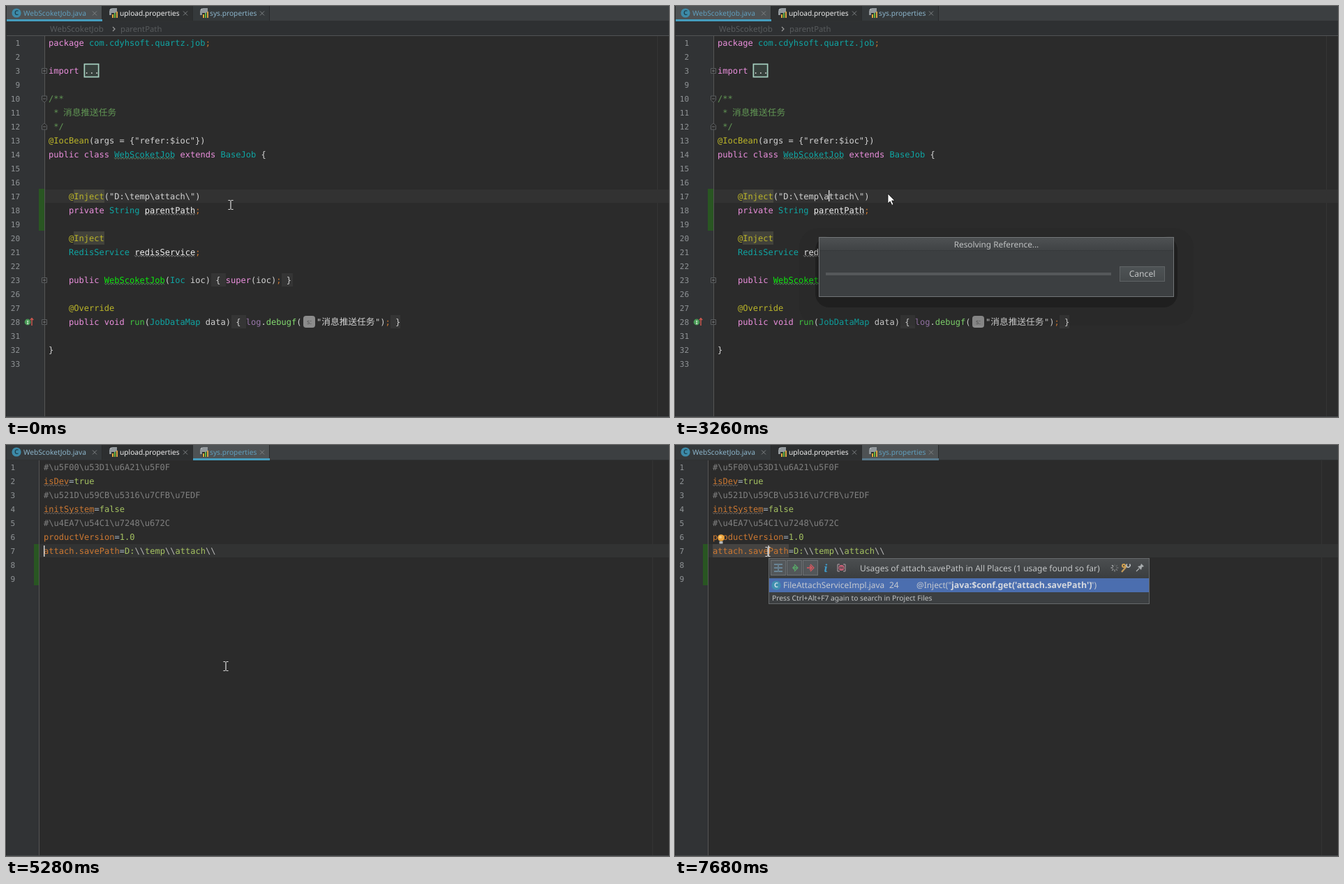
These frames come from a looping animation (950 by 589 pixels, 8000 ms). An HTML page with a canvas:

```html
<!DOCTYPE html>
<html lang="en">
<head>
<meta charset="utf-8">
<title>Editor</title>
<style>
html, body { margin: 0; width: 100%; height: 100%; overflow: hidden; background: #2b2b2b; }
canvas { display: block; width: 950px; height: 589px; }
</style>
</head>
<body>
<canvas id="stage"></canvas>
<script>
const W = 950, H = 589, LOOP = 8000, CW = 7.25;
const MONO = '12.04px "DejaVu Sans Mono", monospace';
const CJK = '12.7px "Noto Sans CJK SC", "Noto Sans CJK", sans-serif';
const ui = (size, weight = '') => `${weight} ${size}px "Noto Sans", sans-serif`;

const canvas = document.getElementById('stage');
const ratio = window.devicePixelRatio || 1;
canvas.width = W * ratio;
canvas.height = H * ratio;
const g = canvas.getContext('2d');
g.scale(ratio, ratio);
g.textRendering = 'geometricPrecision';

const INK = {
  k: '#ea8fdc', c: '#0fa5a3', w: '#d3d3d3', v: '#f0f0f0', o: '#cc7832',
  a: '#bbb529', m: '#41c441', n: '#0ee60e', d: '#83d96f', p: '#9876aa',
  g: '#629755', h: '#808080', e: '#a9b7c6', s: '#a5c261', b: '#b9b9b9'
};

function box(x, y, w, h, color) {
  g.fillStyle = color;
  g.fillRect(x, y, w, h);
}
function frame(x, y, w, h, color, width = 1) {
  g.strokeStyle = color;
  g.lineWidth = width;
  g.strokeRect(x + width / 2, y + width / 2, w - width, h - width);
}
function path(points, color, width = 1, close = false) {
  g.beginPath();
  points.forEach(([x, y], i) => i ? g.lineTo(x, y) : g.moveTo(x, y));
  if (close) g.closePath();
  g.strokeStyle = color;
  g.lineWidth = width;
  g.stroke();
}
function shape(points, color) {
  g.beginPath();
  points.forEach(([x, y]) => g.lineTo(x, y));
  g.fillStyle = color;
  g.fill();
}
function round(x, y, w, h, r, color) {
  g.beginPath();
  g.roundRect(x, y, w, h, r);
  g.fillStyle = color;
  g.fill();
}
function disc(x, y, r, color) {
  g.beginPath();
  g.arc(x, y, r, 0, 7);
  g.fillStyle = color;
  g.fill();
}
function text(s, x, y, color, font = MONO, align = 'left') {
  g.font = font;
  g.textAlign = align;
  g.fillStyle = color;
  g.fillText(s, x, y);
}
function blend(x, y, w, h, top, bottom) {
  const grad = g.createLinearGradient(0, y, 0, y + h);
  grad.addColorStop(0, top);
  grad.addColorStop(1, bottom);
  box(x, y, w, h, grad);
}
// Draws "ink:text" spans on the character grid; y is the middle of the line.
function code(x, y, ...spans) {
  for (const span of spans) {
    const s = span.slice(2);
    text(s, x, y + 4, INK[span[0]]);
    x += s.length * CW;
  }
}
function wave(x, y, w, color) {
  const pts = [];
  for (let i = 0; i <= w; i += 2) pts.push([x + i, y + (i / 2 % 2 ? 1.4 : -0.8)]);
  path(pts, color, 0.75);
}
function badge(x, y, letter, color, ink) {
  disc(x, y, 6.6, color);
  text(letter, x, y + 3.3, ink, ui(9.5, 'bold'), 'center');
}
function cross(x, y) {
  path([[x - 3, y - 3], [x + 3, y + 3]], '#7d8183');
  path([[x + 3, y - 3], [x - 3, y + 3]], '#7d8183');
}
function sheet(x) {
  shape([[x + 4, 3], [x + 11, 3], [x + 11, 8], [x + 5, 13], [x, 13], [x, 7]], '#92989c');
  shape([[x, 6], [x + 3, 3], [x + 3, 6]], '#b5babd');
  box(x + 3, 10, 9, 7, '#2d2f30');
  box(x + 4, 12, 2, 5, '#e0a83c');
  box(x + 7, 10, 2, 7, '#62b543');
  box(x + 10, 8, 2, 9, '#d9a343');
}
function fold(y, kind) {
  const x = 55;
  const pts = kind === '+' ? [[-3.5, -3.5], [3.5, -3.5], [3.5, 3.5], [-3.5, 3.5]]
    : kind === 'v' ? [[-3.5, -4], [3.5, -4], [3.5, 2], [0, 5], [-3.5, 2]]
    : [[-3.5, 4], [3.5, 4], [3.5, -2], [0, -5], [-3.5, -2]];
  const at = pts.map(([a, b]) => [x + a, y + b]);
  shape(at, '#2b2b2b');
  path(at, '#5b5e60', 1, true);
  path([[x - 2, y], [x + 2, y]], '#707375');
  if (kind === '+') path([[x, y - 2], [x, y + 2]], '#707375');
}
function caret(x, y) { box(x, y - 8, 1.4, 16, '#dddddd'); }

function tabs(active, focused) {
  box(0, 0, W, 22, '#3c3f41');
  box(0, 21, W, 1, '#2f3132');
  const list = [['WebScoketJob.java', 0, 138, 25], ['upload.properties', 138, 130, 163],
    ['sys.properties', 268, 110, 292]];
  list.forEach(([name, x, w, tx], i) => {
    const on = i === active;
    box(x, 0, w, 21, on ? '#4e5254' : i === 1 ? '#2d2f30' : '#35393b');
    box(x + w - 1, 0, 1, 21, '#292b2c');
    if (on) box(x, 19, w, 3, focused ? '#459cbd' : '#58788a');
    if (i) sheet(x + 10);
    else badge(15, 10, 'C', '#3d8ba9', '#1f4350');
    text(name, tx, 14, i === 1 ? '#eeeeee' : on ? '#609fbe' : '#8cb5cb', ui(10.2));
    cross(x + w - 11, 10.5);
  });
}
function gutter(top, width, right, numbers, first) {
  box(0, top, width, H - top, '#313335');
  box(width, top, 1, H - top, '#555555');
  numbers.forEach((n, i) => text(n, right, first + 20 * i + 4, '#909497',
    '11px "DejaVu Sans Mono", monospace', 'right'));
}
function edges() {
  box(0, 0, 1, H, '#292b2c');
  box(0, H - 1, W, 1, '#45484a');
}

function javaFile(t) {
  const open = t >= 3660;
  box(0, 0, W, H, '#2b2b2b');
  box(933, 43, 1, H, '#353535');
  box(0, 22, W, 20, '#2e3032');
  text('WebScoketJob', 63, 37, '#585b5d', ui(11.5));
  path([[153, 30], [156, 33], [153, 36]], '#999999', 1.2);
  text('parentPath', 164, 37, '#585b5d', ui(11.3));
  const lines = [1, 2, 3];
  for (let n = 9; n <= 23; n++) lines.push(n);
  lines.push(26, 27, 28, 31, 32, 33);
  gutter(42, 55, 20, lines, 53);
  box(0, 42, W, 1, '#515354');
  box(56, 263, W, 19, '#323232');
  box(47, 262, 8, 60, '#295622');
  [[93, '+'], [133, 'v'], [173, '^'], [393, '+'], [453, '+']].forEach(f => fold(...f));
  disc(31, 453, 4.4, '#4a9b57');
  text('I', 31, 456, '#dff0df', ui(7, 'bold'), 'center');
  path([[37, 458], [37, 448]], '#d45a50', 1.4);
  path([[34.8, 450], [37, 447.5], [39.2, 450]], '#d45a50', 1.2);

  box(97, 263, 44, 19, '#46463e');
  box(97, 323, 44, 19, '#42423b');
  [[294, 385, 21], [395, 385, 16], [323, 445, 21], [551, 445, 14]]
    .forEach(([x, y, w]) => box(x, y - 2, w, 19, '#353535'));

  const L = 61, T = 90;
  code(L, 53, 'k:package ', 'c:com.cdyhsoft.quartz.job', 'o:;');
  code(L, 93, 'k:import ');
  box(112, 83, 21, 19, '#37403c');
  frame(111.5, 82.5, 22, 20, '#a6d0c0', 1.7);
  code(112, 93, 'w:...');
  code(L, 133, 'g:/**');
  code(L, 153, 'g: *');
  text('消息推送任务', 82, 157, INK.g, CJK);
  code(L, 173, 'g: */');
  code(L, 193, 'a:@IocBean', 'w:(args = {"refer:$ioc"})');
  code(L, 213, 'k:public class ', 'c:WebScoketJob', 'k: extends ', 'c:BaseJob', 'w: {');
  wave(155, 218, 87, '#699a78');
  code(T, 273, 'a:@Inject', open ? `w:("java:$conf.get('attach.savePath')")` : 'w:("D:\\temp\\attach\\")');
  code(T, 293, 'k:private ', 'c:String ', 'v:parentPath', 'o:;');
  wave(199, 298, 73, '#9a9a9a');
  code(T, 333, 'a:@Inject');
  code(T, 353, 'c:RedisService ', 'v:redisService', 'o:;');
  wave(184, 358, 87, '#9a9a9a');
  code(T, 393, 'k:public ', 'n:WebScoketJob', 'w:(', 'c:Ioc', 'w: ioc) { ', 'k:super', 'w:(ioc)', 'o:;', 'w: }');
  wave(141, 398, 87, '#659c6b');
  code(T, 433, 'a:@Override');
  code(T, 453, 'k:public void ', 'm:run', 'w:(', 'c:JobDataMap', 'w: data) { ', 'p:log', 'w:.', 'd:debugf', 'w:(');
  round(426, 444, 17, 17, 4, '#8c8c8c');
  text('s:', 434.5, 456, '#555555', ui(9.5), 'center');
  code(445, 453, 'w:"');
  text('消息推送任务', 452.3, 457, INK.w, CJK);
  code(529, 453, 'w:")', 'o:;', 'w: }');
  code(L, 493, 'w:}');

  if (t >= 460 && t < 870) caret(155, 272);
  if (t >= 2070 && t < 3660) caret(220, 272);
  if (t >= 1660 && t < 2070) foldHint();
  if (t >= 2460 && t < 3660) dialog();
  if (open) chooser();
  tabs(0, !open);
  edges();
}

function foldHint() {
  box(0, 283, 420, 25, '#2b2b2b');
  box(0, 283, 55, 25, '#313335');
  frame(0, 283, 420, 25, '#5b5d5f');
  code(90, 295, 'a:@Inject', `w:("java:$conf.get('attach.savePath')")`);
}

function dialog() {
  round(178, 318, 565, 140, 28, 'rgba(0,0,0,0.05)');
  round(201, 330, 519, 102, 20, 'rgba(0,0,0,0.24)');
  box(206, 331, 509, 86, '#3c3f41');
  blend(207, 332, 507, 18, '#4e5153', '#404345');
  box(207, 350, 507, 1, '#36393b');
  frame(206, 331, 509, 86, '#727577');
  text('Resolving Reference...', 460.5, 346, '#bfc1c2', ui(11.8), 'center');
  box(216, 382, 409, 4, '#55585a');
  blend(637, 373, 65, 22, '#4e5355', '#45494b');
  frame(637, 373, 65, 22, '#5f6365');
  text('Cancel', 669.5, 388.3, '#c3c5c6', ui(12.1), 'center');
}

function chooser() {
  box(220, 282, 375, 61, '#3c3f41');
  blend(221, 283, 373, 19, '#46494b', '#3d4042');
  text('Choose Declaration', 407, 297, '#c3c5c6', ui(11.9), 'center');
  box(221, 303, 373, 19, '#4b6eaf');
  [['sys.properties', 312.5, '#c0c4ca'], ['upload.properties', 332.5, '#85888a']].forEach(([name, y, color]) => {
    badge(234, y, 'p', '#8566a8', '#e2d4f0');
    text('attach.savePath', 245, y + 4, '#c0c4ca');
    text(name, 361, y + 4, color);
    text('web-admin', 504, y + 4, '#b9bcc0');
    shape([[574, y - 5], [579, y - 5], [581, y - 3], [587, y - 3], [587, y + 5], [574, y + 5]], '#8d9aa3');
    box(580, y, 8, 7, '#3c4a57');
    box(582, y + 1, 6, 6, '#40b6e0');
  });
  frame(220, 282, 375, 61, '#777a7c');
}

function propsFile(t) {
  box(0, 0, W, H, '#2b2b2b');
  box(926, 22, 1, H, '#333333');
  gutter(22, 47, 13, [1, 2, 3, 4, 5, 6, 7, 8, 9], 32);
  box(48, 142, W, 19, '#323333');
  box(40, 142, 7, 59, '#295622');
  if (t >= 5670) box(54, 142, 109, 19, '#454341');
  const x = 54;
  code(x, 32, 'h:#\\u5F00\\u53D1\\u6A21\\u5F0F');
  code(x, 52, 'o:isDev', 'e:=', 's:true');
  code(x, 72, 'h:#\\u521D\\u59CB\\u5316\\u7CFB\\u7EDF');
  code(x, 92, 'o:initSystem', 'e:=', 's:false');
  code(x, 112, 'h:#\\u4EA7\\u54C1\\u7248\\u672C');
  code(x, 132, 'o:productVersion', 'e:=', 's:1.0');
  code(x, 152, 'o:attach.savePath', 'e:=', 's:D:', 'b:\\\\', 's:temp', 'b:\\\\', 's:attach', 'b:\\\\');
  wave(54, 57.5, 36, '#84796f');
  wave(54, 97.5, 73, '#84796f');
  caret(t < 6480 ? 54 : 133.4, 152);
  if (t >= 7280) {
    disc(66, 133, 4.8, '#f0a63c');
    disc(65, 132, 2, '#f8cf84');
    box(63.5, 138, 5, 3.5, '#b5b8ba');
  }
  if (t >= 6870) usages(t);
  tabs(2, t < 6870);
  edges();
}

function usages(t) {
  box(134, 162, 546, 66, '#3c3f41');
  blend(135, 163, 544, 27, '#4b4e50', '#3b3e40');
  [137, 160, 183].forEach(x => {
    box(x, 165, 22, 22, '#53575a');
    frame(x, 165, 22, 22, '#6c7073');
  });
  const steel = '#79a3bd', green = '#59a869', red = '#db5860';
  [142, 149].forEach(x => [171, 176, 181].forEach(y => box(x, y - 0.5, 5, 1.2, steel)));
  path([[148, 170], [148, 182]], steel);
  [[171, green], [194, red]].forEach(([x, color], i) => {
    const d = i ? 1 : -1;
    path([[x - 5 * d, 176], [x + 2 * d, 176]], color, 1.5);
    path([[x - d, 173], [x + 2 * d, 176], [x - d, 179]], color, 1.5);
    path([[x, 171], [x + 5, 176], [x, 181]], color, 1.2);
  });
  text('i', 216, 181.5, '#3f9ccb', 'italic bold 15px "Noto Serif", serif', 'center');
  path([[236, 171], [233, 171], [233, 181], [236, 181]], '#b5a0a8');
  path([[241, 171], [244, 171], [244, 181], [241, 181]], '#b5a0a8');
  disc(238.5, 176, 4, '#d0627a');
  text('m', 238.5, 178.2, '#3c3f41', ui(6.5, 'bold'), 'center');
  text('Usages of attach.savePath in All Places (1 usage found so far)', 265, 180.6, '#c3c5c6', ui(12));

  const step = t < 7280 ? 0 : t < 7680 ? 3 : 6;
  for (let i = 0; i < 8; i++) {
    const a = i * Math.PI / 4, c = Math.cos(a), s = Math.sin(a);
    g.globalAlpha = 0.15 + 0.8 * ((i - step + 8) % 8) / 8;
    path([[630 + 2.5 * c, 176 + 2.5 * s], [630 + 5.5 * c, 176 + 5.5 * s]], '#c8caca', 1.3);
  }
  g.globalAlpha = 1;
  path([[640, 182], [647, 174]], '#c39a5a', 2.2);
  g.beginPath();
  g.arc(649.5, 172.5, 2.6, -0.8, 4);
  g.strokeStyle = '#b8bcbe';
  g.lineWidth = 1.6;
  g.stroke();
  disc(643, 173, 3, '#d2a150');
  disc(643, 173, 1.1, '#3c3f41');
  path([[661, 181], [665, 177]], '#a9adaf', 1.2);
  shape([[663, 174], [667, 173], [668, 170], [672, 174], [669, 175], [668, 179]], '#a9adaf');

  box(135, 191, 544, 20, '#4b6eaf');
  badge(145, 201, 'C', '#4090b0', '#d0e2ea');
  text('FileAttachServiceImpl.java', 155, 205, '#c5c9d0', ui(11.85));
  text('24', 307, 205, '#c5c9d0', ui(12));
  text('@Inject("', 346, 205, '#c5c9d0', ui(11.9));
  text("java:$conf.get('attach.savePath')", 396, 205, '#d6d9df', ui(12.35, 'bold'));
  text('")', 595.5, 205, '#c5c9d0', ui(12));
  text('Press Ctrl+Alt+F7 again to search in Project Files', 139, 223, '#c3c5c6', ui(10.25));
  frame(134, 162, 546, 66, '#65686a');
}

// Pointer steps: start time, x, y, and 1 for the arrow.
const POINTER = [
  [0, 322, 285], [1300, 285, 277], [1660, 221, 271], [2460, 220, 269, 1], [3260, 305, 269, 1],
  [3660, 307, 269], [4070, 308, 271], [4470, 311, 322, 1], [4870, 314, 306, 1],
  [5280, 315, 317], [6060, 153, 167], [6480, 133, 153]
];
function pointer(t) {
  const [, x, y, arrow] = POINTER.filter(p => p[0] <= t).pop();
  if (arrow) {
    const pts = [[0, 0], [0, 14], [3.2, 11], [5.8, 16.4], [8, 15.4], [5.6, 10], [10, 10]]
      .map(([a, b]) => [x + a, y + b]);
    shape(pts, '#ffffff');
    path(pts, '#111111', 0.8, true);
    return;
  }
  const c = '#dddddd';
  box(x - 0.6, y - 6, 1.2, 12, c);
  [-7, 6].forEach(d => {
    box(x - 3.6, y + d, 3, 1, c);
    box(x + 0.6, y + d, 3, 1, c);
  });
}

function draw(now) {
  const t = now % LOOP;
  (t < 5280 ? javaFile : propsFile)(t);
  pointer(t);
}
const start = performance.now();
function tick() {
  draw(performance.now() - start);
  requestAnimationFrame(tick);
}
tick();
</script>
</body>
</html>
```
